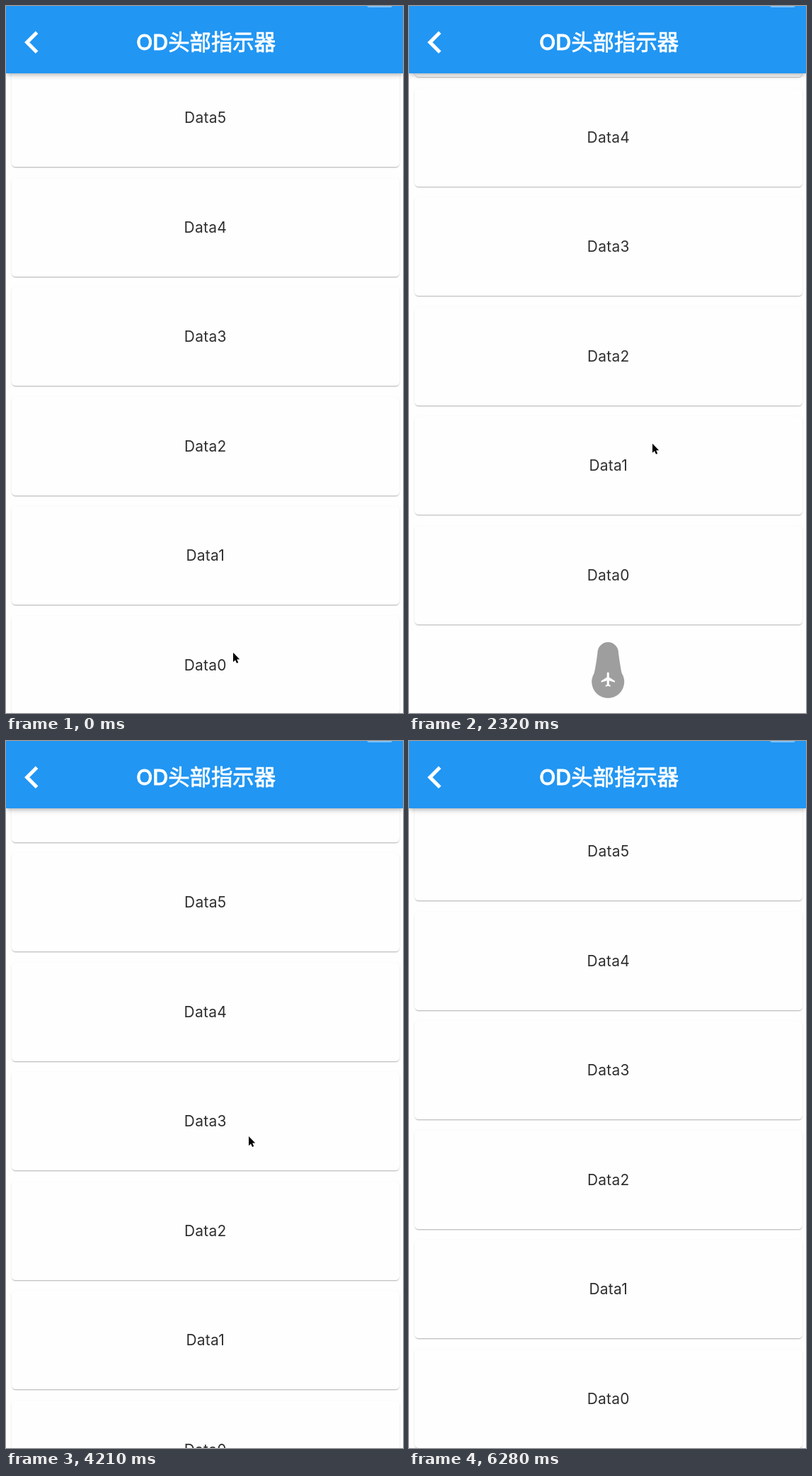
Write an HTML page that moves like this. It is 561x998 px and loops after 6380 ms.

```html
<!DOCTYPE html>
<html lang="zh">
<head>
<meta charset="utf-8">
<title>头部指示器</title>
<style>
  html, body { margin: 0; width: 100%; height: 100%; overflow: hidden; background: #fefefe; }
  #stage { position: relative; width: 561px; height: 998px; overflow: hidden; background: #fefefe; }
  #list { position: absolute; left: 0; top: 0; will-change: transform; }
  .card {
    position: absolute; left: 8px; width: 547.5px; height: 139px;
    border-radius: 5.5px; background: #fefefe;
    box-shadow: 0 2.5px 1.5px -1.5px rgba(0,0,0,.13), 0 1.3px 1.3px rgba(0,0,0,.11), 0 1px 3px rgba(0,0,0,.09);
    font: 20.9px/139px Inter, Roboto, sans-serif; letter-spacing: .3px;
    text-align: center; color: #2e2e2e;
  }
  svg { position: absolute; left: 0; top: 0; }
  #bar {
    position: absolute; left: 0; top: 0; width: 561px; height: 94.5px; background: #2196f3;
    box-shadow: 0 2.5px 5px -1px rgba(0,0,0,.2), 0 5px 6.5px rgba(0,0,0,.08), 0 1px 10px rgba(0,0,0,.06);
  }
  #bar text {
    font: 500 30.4px Inter, "Noto Sans CJK SC", "Noto Sans CJK", sans-serif;
    fill: #fff; stroke: #fff; stroke-width: .8px;
  }
</style>
</head>
<body>
<div id="stage">
  <svg width="561" height="998">
    <g id="drop">
      <g fill="#9e9e9e"><circle r="23"/><path id="neck"/></g>
      <path fill="#fff" transform="translate(-11.7 -15.6) scale(1.02)" d="M21 16v-2l-8-5V3.5c0-.83-.67-1.5-1.5-1.5S10 2.67 10 3.5V9l-8 5v2l8-2.5V19l-2 1.5V22l3.5-1 3.5 1v-1.5L13 19v-5.5l8 2.5z"/>
    </g>
    <g id="spinner" stroke="#3c3c44" stroke-width="2.9" stroke-linecap="round"></g>
  </svg>
  <div id="list"></div>
  <div id="bar">
    <svg width="561" height="95">
      <rect x="510" y="-8" width="36" height="10" rx="3" fill="#7cc1f8"/>
      <path fill="#fff" stroke="#fff" stroke-width=".9" transform="translate(27 33.3) scale(1.5)" d="M11.67 3.87L9.9 2.1 0 12l9.9 9.9 1.77-1.77L3.54 12z"/>
      <text x="282.5" y="62" text-anchor="middle">OD头部指示器</text>
    </svg>
  </div>
  <svg width="561" height="998">
    <path id="cursor" d="M0 0V13.2L3 10.4 5 15 7.2 14 5.2 9.5H9.2Z" fill="#000" stroke="#fff" stroke-width="1.4" paint-order="stroke"/>
  </svg>
</div>
<script>
const LOOP = 6380, GAP = 154.5, DOCK = 838;
const LOADING = 4400, LOADED = 5500, RETURN = 5800;
const $ = id => document.getElementById(id);

const linear = k => k;
const easeIn = k => k ** 2.2;
const easeOut = k => 1 - (1 - k) ** 3;
const smooth = k => k * k * (3 - 2 * k);

// Each gesture leads from the last pose to a new one: [lowest card y, pointer x, pointer y]
const start = [930, 321, 913];
const gestures = [
  { from: 0, to: 460, pose: [904, 326, 845], ease: linear },
  { from: 650, to: 1560, pose: [DOCK, 337, 701], ease: linear },
  { from: 1560, to: 2320, pose: [803, 344, 618], ease: easeOut },
  { from: 2320, to: 3220, pose: [696, 345, 283], ease: linear },
  { from: 3220, to: 4210, pose: [1000, 343, 558], ease: easeIn },
  { from: 4300, to: 4960, pose: [834, 333, 486], ease: smooth },
  { from: 4990, to: 5510, pose: [832, 325, 966], ease: linear },
  { from: RETURN, to: 6280, pose: [928, 325, 966], ease: easeOut }
];

function poseAt(t) {
  return gestures.reduce((last, { from, to, pose, ease }) => {
    const k = ease(Math.min(1, Math.max(0, (t - from) / (to - from))));
    return last.map((v, i) => v + (pose[i] - v) * k);
  }, start);
}

for (let i = 0; i < 7; i++) {
  const card = document.createElement('div');
  card.className = 'card';
  card.style.top = -69.5 - GAP * i + 'px';
  card.textContent = 'Data' + i;
  $('list').append(card);
}

const spokes = Array.from({ length: 12 }, (_, i) => {
  const line = document.createElementNS('http://www.w3.org/2000/svg', 'line');
  line.setAttribute('y1', -8.8);
  line.setAttribute('y2', -14);
  line.setAttribute('transform', `rotate(${i * 30})`);
  $('spinner').append(line);
  return line;
});

// Sticky drop: a cap that shrinks as it is pulled away from the circle
function neck(pull) {
  const r = 23, top = r - pull * .2, mid = r - pull * .1;
  return `M${-r} 0C${-r} 0 ${-mid} ${-pull / 5} ${-top} ${-pull}` +
    `A${top} ${top} 0 0 1 ${top} ${-pull}C${top} ${-pull} ${mid} ${-pull / 5} ${r} 0Z`;
}

function show(el, on) { el.style.display = on ? '' : 'none'; }
function move(el, x, y) { el.setAttribute('transform', `translate(${x} ${y})`); }

function draw() {
  const t = performance.now() % LOOP;
  const [y, px, py] = poseAt(t);
  const shift = Math.max(0, y - DOCK);
  $('list').style.transform = `translateY(${y}px)`;

  // The pull stiffens past 42px
  const reach = Math.max(0, 844 - y);
  const pull = Math.min(reach, 42 + (reach - 42) * .33);
  show($('drop'), t < LOADING);
  move($('drop'), 281.2, 954 + shift);
  $('neck').setAttribute('d', neck(pull));

  show($('spinner'), t >= LOADING && t < LOADED);
  move($('spinner'), 281.5, 961.5 + shift);
  const head = 9 + Math.floor((t - 4960) * .012);
  spokes.forEach((s, i) => {
    const age = (((head - i) % 12) + 12) % 12;
    s.setAttribute('opacity', Math.max(.16, .58 - age * .075));
  });

  show($('cursor'), t < RETURN);
  move($('cursor'), px, py);
  requestAnimationFrame(draw);
}
draw();
</script>
</body>
</html>
```
